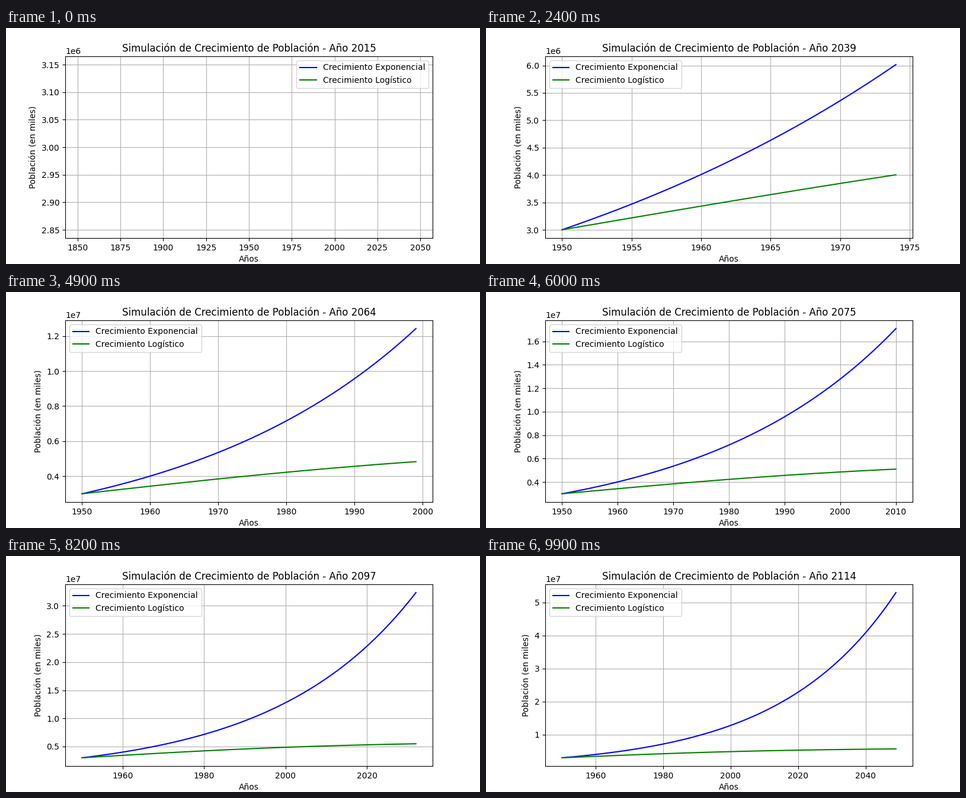
These frames come from a looping animation (800x400 px, 10 s). A matplotlib script:

```python
import numpy as np
import matplotlib.pyplot as plt
from matplotlib.animation import FuncAnimation

START, CAPACITY, RATE = 3_000_000, 6_000_000, 0.029
FIRST_YEAR, TITLE_YEAR = 1950, 2015
FRAMES, INTERVAL = 100, 100

plt.rcParams["font.family"] = "DejaVu Sans"

t = np.arange(FRAMES)
years = FIRST_YEAR + t
exponential = START * np.exp(RATE * t)
logistic = CAPACITY / (1 + (CAPACITY / START - 1) * np.exp(-RATE * t))

fig, ax = plt.subplots(figsize=(8, 4), dpi=100)


def init():
    return []


def update(i):
    ax.clear()
    n = i + 1
    ax.plot(years[:n], exponential[:n], color="blue", label="Crecimiento Exponencial")
    ax.plot(years[:n], logistic[:n], color="green", label="Crecimiento Logístico")
    ax.set_title(f"Simulación de Crecimiento de Población - Año {TITLE_YEAR + i}")
    ax.set_xlabel("Años")
    ax.set_ylabel("Población (en miles)")
    ax.legend()
    ax.grid(True)
    return []


anim = FuncAnimation(fig, update, frames=FRAMES, init_func=init,
                     interval=INTERVAL, repeat=True, repeat_delay=0)
plt.show()
```
